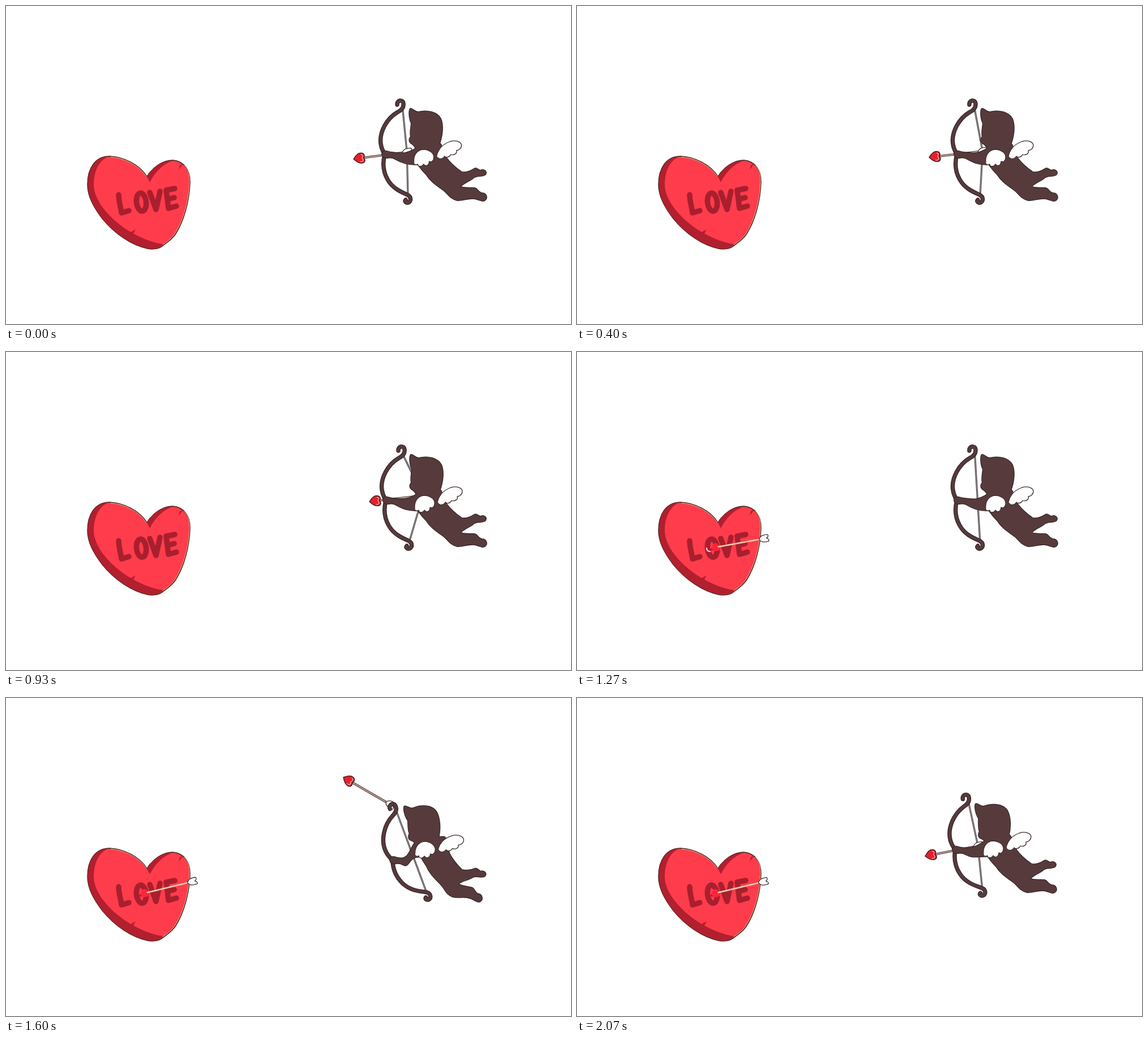
Animation of 998 by 561 pixels, one loop 2.14 s. Source, as an HTML page:

```html
<!DOCTYPE html>
<html lang="en">
<head>
<meta charset="utf-8">
<title>Cupid and heart</title>
<style>
  html, body { margin: 0; width: 100%; height: 100%; overflow: hidden; background: #fff; }
  svg { display: block; width: 100%; height: 100%; }
  path, ellipse { stroke-linecap: round; stroke-linejoin: round; }
  .edge { fill: #2c2022; stroke: #2c2022; stroke-width: 2; }
  .skin { fill: #573a3c; }
  .line { fill: none; }
  .wing { fill: #fff; stroke: #40302f; stroke-width: 1.3; }
  .side { fill: #b21f2f; }
  .letters { fill: none; stroke: #a91f2e; stroke-width: 9.5; }
  .tip { fill: #e5212d; stroke: #3a2022; stroke-width: 1.4; }
  .rim { fill: none; stroke: #ffc9c6; stroke-width: 1; }
  .shaft { stroke: #d9aaa3; stroke-width: 1.8; }
  .pale .tip { fill: #fff; }
  .pale .rim { stroke: #fff; }
  .pale .shaft { stroke: #b9b3b4; }
</style>
</head>
<body>
<svg viewBox="0 0 998 561">
  <defs>
    <g id="figure">
      <path id="head" d="M715 181 C720 180 722 187 729 187 C745 183 763 187 769 199 C774 211 772 230 766 245 L760 258 L728 258 C725 250 721 244 716 242 C712 239 713 234 716 230 C714 225 716 217 717 207 C713 199 712 185 715 181Z"/>
      <path id="torso" d="M726 248 L764 241 C770 241 771 256 779 269 C788 281 798 288 805 293 C814 294 821 291 827 287 C832 284 834 290 838 290 C845 287 850 292 847 297 C844 302 832 298 826 303 C818 310 808 312 803 319 C812 322 820 320 828 321 C833 322 834 329 841 330 C848 330 851 338 847 342 C843 347 835 341 828 340 C816 338 808 344 797 343 C786 341 781 332 774 326 C762 317 750 310 742 297 C734 289 727 280 722 270Z"/>
      <path id="arm"/>
    </g>
    <path id="limbs" d="M693 174 C692 166 703 164 704 172 C705 180 700 184 694 187 C675 198 661 222 664 243 C665 252 668 256 671 262 C667 277 668 292 676 306 C685 322 700 328 711 333 C720 338 717 348 710 347 C707 346 706 344 708 342"/>
    <path id="feather" d="M87 0 C89 -5 93 -7 103 -6 C105 -4 103 -1 100 0 C103 1 105 4 103 6 C93 7 89 5 87 0Z"/>
    <path id="outline" d="M144 315 C144 287 157 265 183 265 C208 266 236 280 249 301 C259 284 277 272 295 272 C315 274 325 289 325 310 C324 345 314 380 299 403 C292 413 284 417 277 423 C270 429 262 430 250 428 C222 422 192 402 170 375 C155 355 144 336 144 315Z"/>
  </defs>

  <g role="img" aria-label="LOVE">
    <use href="#outline" fill="#fe3c4c" stroke="#47291f" stroke-width="1.6"/>
    <path class="side" d="M144.500 315 C144.500 288 157 266 181 265.500 C165 272 155 290 155 316 C156 342 178 369 208 391 C232 407 255 417 278 420 C270 429 262 429 250 427.500 C222 421 192 402 170 375 C155 355 144.500 336 144.500 315Z"/>
    <path class="side" d="M249 301 C258 285 275 273 294 273 C276 280 263 293 254 311Z"/>
    <path class="side" d="M305 289 L307 281 L313 278Z M213 403 L229 394 L223 405Z"/>
    <path class="line" stroke="#e9b98f" stroke-width=".9" d="M185 266.500 C209 268 235 281 248 301 M315 281 C323 288 324 300 324 311 C323 344 313 379 298 402 C291 412 284 416 277 421"/>
    <g class="letters">
      <path d="M199 333 C199 345 203 355 204 365 L217 361"/>
      <ellipse cx="239" cy="346" rx="8.500" ry="16" transform="rotate(-7 239 346)"/>
      <path d="M254 329 L265 359 L272 327"/>
      <path d="M298 322 L283 325 L287 357 L301 353 M285 341 L297 338"/>
    </g>
  </g>
  <g id="stuck">
    <path id="crumb" class="line" stroke-width="2.200" d="M229 346 C229 350 232 352 235 352"/>
    <g id="dart">
      <path fill="#a31a29" d="M-8 3 L4 -8 L9 8Z"/>
      <path fill="#ff2438" d="M-5 1 C-2 -6 3 -10 6 -6 C9 -5 10 -2 8 0 C12 3 9 8 5 7 C1 8 -3 5 -5 1Z"/>
      <path class="line" stroke="#f2cda9" stroke-width="2.600" d="M8 0 H86"/>
      <use href="#feather" class="wing" x="-6"/>
    </g>
  </g>

  <path id="cord" class="line" stroke="#3a2f31" stroke-width="3"/>
  <path id="core" class="line" stroke="#b5acae" stroke-width="1.100"/>
  <g id="arrow">
    <path class="line" stroke="#43302f" stroke-width="3.800" d="M18 0 H95"/>
    <path class="line shaft" d="M18 0 H95"/>
    <use href="#feather" class="wing"/>
    <path class="tip" d="M0 0 C4 -5 9 -10 14 -9 C20 -8 21 -3 18 0 C21 4 20 9 14 9 C9 9 4 5 0 0Z"/>
    <path class="rim" d="M11 6 C16 8 18 4 15 0 C18 -3 17 -6 14 -6"/>
  </g>
  <g id="bow" class="line">
    <use href="#limbs" stroke="#2c2022" stroke-width="7.400"/>
    <use href="#limbs" stroke="#573a3c" stroke-width="5.200"/>
  </g>
  <use href="#figure" class="edge"/>
  <use href="#figure" class="skin"/>
  <g id="wings" class="wing">
    <path d="M762 265 C765 252 774 243 786 239 C797 236 806 240 806 246 C806 252 800 255 797 255 C799 260 793 264 787 262 C785 267 779 268 776 265 C773 270 766 272 762 265Z"/>
    <path d="M722 275 C721 262 729 253 740 253 C750 254 758 260 757 268 C757 274 752 276 749 274 C749 281 743 284 739 279 C736 284 729 284 729 279 C725 282 721 279 722 275Z"/>
  </g>
</svg>
<script>
const LOOP = 2140;
const RELEASE = 17, HIT = 18, DRAW = 20, NOCK = 26, LAST = 31;
const el = id => document.getElementById(id);
const set = (id, name, value) => el(id).setAttribute(name, value);
const mix = (a, b, u) => a + (b - a) * u;

// step, head x y turn, body x y turn, wings x y turn, hand x y, bow turn
const POSES = [
  [0, -1, 0, 0, 0, 0, 0, -1.5, 0, 0, 669, 262, 0],
  [6, 0, 0, 0, 0, 0, 0, 0, 0, 0, 671, 262, 0],
  [19, 0, 0, 0, 0, 0, 0, 0, 0, 0, 671, 262, 0],
  [21, -2, 4, -9, 7, 2, 11, 6, 3, 6, 687, 291, -20.8],
  [26, -9, 5, -10, 6, -1, 9, -2, 0, 3, 680, 283, -14.4],
  [31, -7, 2, -7, -2, 0, 0, -4, -1, 0, 668, 268, -5.5]
];
// step, tip x y, turn
const ARROW = [
  [0, 614, 270, -7.5], [6, 622, 267, -6.5], [14, 642, 264, -6.5], [16, 643, 264, -6.5],
  [17, 437, 300, -11], [20, 693, 165, 57], [21, 668, 124, 57], [22, 650, 80, 59],
  [23, 630, 37, 58], [24, 596, 140, 30], [25, 612, 245, 3], [26, 628, 291, -7],
  [31, 615, 279, -11]
];

function sample(track, step) {
  const i = Math.max(1, track.findIndex(row => row[0] >= step));
  const a = track[i - 1], b = track[i];
  const u = (step - a[0]) / (b[0] - a[0]);
  return a.slice(1).map((v, n) => mix(v, b[n + 1], u));
}

function place(id, x, y, turn, px, py) {
  set(id, 'transform', `translate(${x} ${y}) rotate(${turn} ${px} ${py})`);
}

function polar(x, y, dx, dy, turn) {
  const a = turn * Math.PI / 180, c = Math.cos(a), s = Math.sin(a);
  return [x + dx * c - dy * s, y + dx * s + dy * c];
}

function drawCupid(step) {
  const [hx, hy, hr, bx, by, br, wx, wy, wr, x, y, turn] = sample(POSES, step);
  place('head', hx, hy, hr, 744, 215);
  place('torso', bx, by, br, 745, 262);
  place('wings', wx, wy, wr, 755, 265);
  place('bow', x - 671, y - 262, turn, 671, 262);
  const sx = wx / 2, sy = wy / 2;
  set('arm', 'd', `M${x - 4} ${y - 4} C${x} ${y - 9} ${x + 7} ${y - 4} ${x + 12} ${y - 4}
    C${x + 32} ${y - 1} ${712 + sx} ${260 + sy} ${726 + sx} ${250 + sy}
    L${742 + sx} ${268 + sy} L${728 + sx} ${280 + sy}
    C${710 + sx} ${280 + sy} ${x + 30} ${y + 15} ${x + 18} ${y + 8}
    C${x + 12} ${y + 4} ${x + 8} ${y + 6} ${x + 3} ${y + 6} C${x - 4} ${y + 6} ${x - 6} ${y} ${x - 4} ${y - 4}Z`);

  const [tx, ty, tr] = sample(ARROW, step);
  place('arrow', tx, ty, tr, 0, 0);
  set('arrow', 'class', step >= DRAW && step < 24 ? 'pale' : '');
  set('arrow', 'visibility', step >= HIT && step < DRAW ? 'hidden' : 'visible');

  const top = polar(x, y, 32, -77, turn), end = polar(x, y, 41, 74, turn);
  const rest = [mix(top[0], end[0], .5), mix(top[1], end[1], .5)];
  const grip = polar(tx, ty, 95, 0, tr);
  const pull = step < RELEASE ? 1 : Math.max(0, (step - NOCK) / (LAST - NOCK));
  const nock = rest.map((v, n) => mix(v, grip[n], pull));
  const cord = `M${top} L${nock} L${end}`;
  set('cord', 'd', cord);
  set('core', 'd', cord);
}

function drawDart(step) {
  const age = step - HIT;
  set('stuck', 'visibility', age < 0 ? 'hidden' : 'visible');
  if (age < 0) return;
  const shake = -6 * Math.exp(-age / 1.7) * Math.cos(Math.PI * age);
  place('dart', 242, 345, -13.5 + shake, 0, 0);
  set('crumb', 'stroke', age < 2 ? '#ffe9e2' : '#e59a7c');
  set('crumb', 'opacity', age < 5 ? 1 : 0);
}

function frame(now) {
  const t = now % LOOP;
  // fifteen steps per second, on a 10 ms grid
  const step = Math.min(LAST, Math.floor((Math.floor(t / 10) * 3 + 1) / 20));
  drawCupid(step);
  drawDart(step);
}

let start;
function tick(now) {
  start ??= now;
  frame(now - start);
  requestAnimationFrame(tick);
}
frame(0);
requestAnimationFrame(tick);
</script>
</body>
</html>
```
